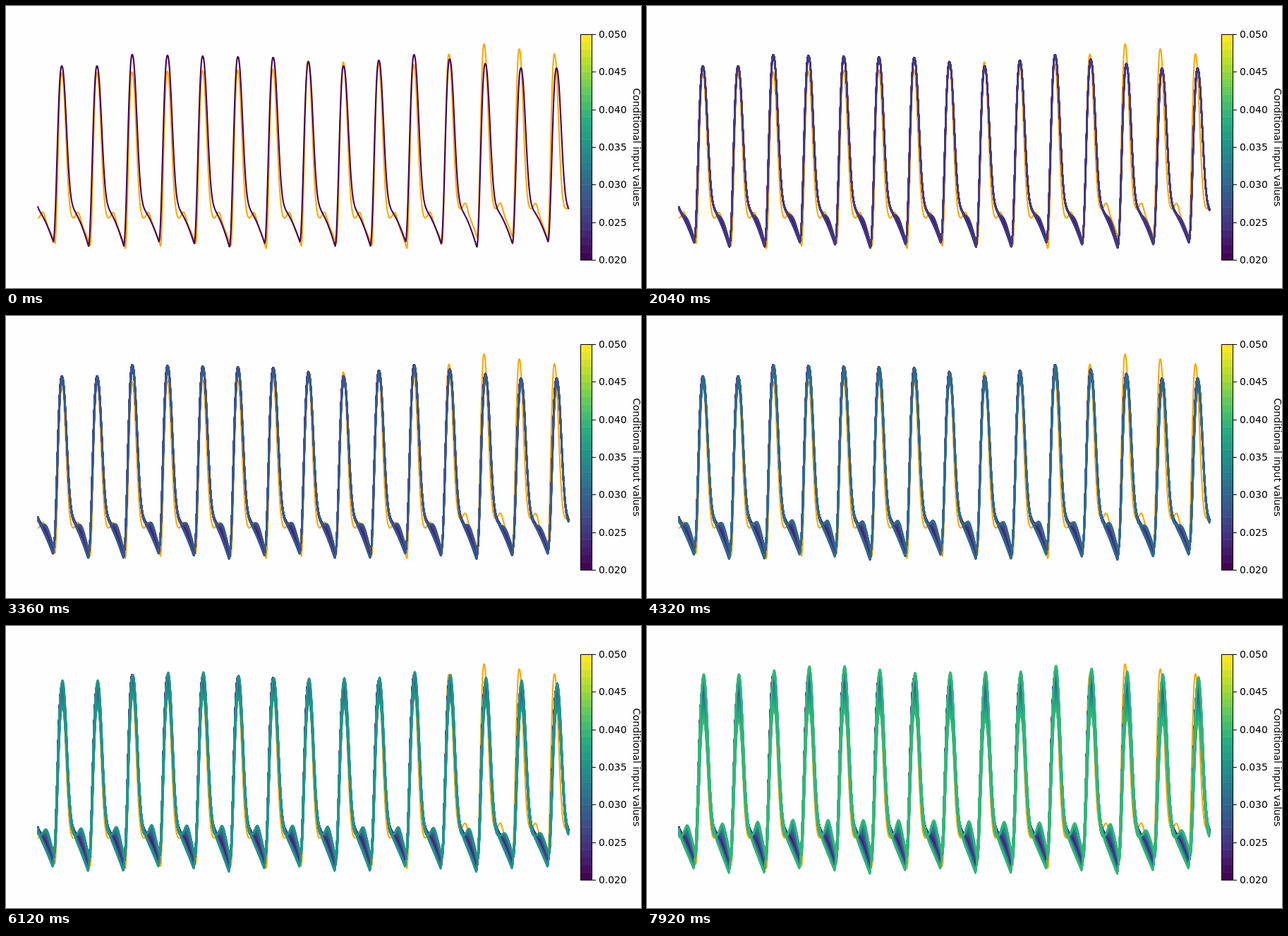
These frames come from a looping animation (900 px wide and 400 px high, 8 s). An HTML page with a canvas:

```html
<!DOCTYPE html>
<html lang="en">
<head>
<meta charset="utf-8">
<style>
  html, body { margin: 0; width: 100%; height: 100%; overflow: hidden; background: #fefefe; }
  canvas { display: block; }
</style>
</head>
<body>
<canvas id="stage" width="900" height="400"></canvas>
<script>
const ctx = document.getElementById('stage').getContext('2d');
const LOOP = 8000, STEP = 120, LAST = 66, LEVELS = 30;
const LEFT = 45, RIGHT = 797.5;

const lerp = (a, b, t) => a + (b - a) * t;
const clamp = v => Math.min(Math.max(v, 0), 1);
const ease = v => (1 - Math.cos(Math.PI * clamp(v))) / 2;

// Linear interpolation through a few [beat, value] keys.
function along(keys, i) {
  const k = keys.findIndex(([at]) => at >= i);
  if (k < 0) return keys[keys.length - 1][1];
  if (k === 0) return keys[0][1];
  const [[a, from], [b, to]] = [keys[k - 1], keys[k]];
  return lerp(from, to, (i - a) / (b - a));
}

// Beat 0 peaks left of the plot; its tail opens the picture.
const peakX = i => 29.1 + 49.93 * i + .55 * Math.max(0, i - 11);
const restTop = i => along([[2, 85], [3, 69], [7, 73], [9, 85], [11, 69], [14, 88]], i);
const grownTop = i => along([[2, 68], [4.5, 54], [7, 66], [10, 64], [11, 56], [15, 72]], i);
const trough = i => 338 + 4 * Math.sin(2 * Math.PI * (i - 1.6) / 3.5);
const bumpShift = i => along([[0, 0], [3, -8], [7, -7], [12, -2], [13, 7]], i);
const referenceBump = i => along([[11, 293], [12, 280]], i);

const rest = {
  peak: peakX, trough, lead: 12, width: 8.8,
  floor: () => 289, tailStart: 15, power: 1.5
};
const tall = {
  peak: i => peakX(i) + 1.5, trough: i => trough(i) + 10, lead: 14.5, width: 8.3,
  floor: () => 292, tailStart: 13, power: 1
};
const bumpy = {
  peak: i => peakX(i) + 1, trough: i => trough(i) - 8, lead: 11, width: 8.2,
  floor: () => 302, tailStart: 15, power: 6,
  bump: i => 20 - bumpShift(i), bumpAt: 27, bumpWidth: 6
};
const reference = {
  peak: i => 29.1 + 49.88 * i, lead: 9.7, width: 7.8,
  trough: i => along([[11, 340.5], [14, 328]], i) + 3.5 * Math.cos(Math.PI * (i - 3) / 2),
  floor: i => referenceBump(i) + 10, tailStart: 17, power: 2,
  bump: () => 13, bumpAt: 23.5, bumpWidth: 4.5
};
const referenceTop = i => along([[1, 95], [7, 90], [8, 78], [11, 83], [13, 54], [15, 68]], i);

// Height of a pulse train: eased rise, bell-shaped fall, then a sloping tail with an optional bump.
function pulse(shape, top, x) {
  let i = Math.floor((x + 25) / 50);
  if (x >= shape.peak(i + 1) - shape.lead) i++;
  if (x < shape.peak(i) - shape.lead) i--;
  const d = x - shape.peak(i);
  if (d < 0) return lerp(top(i), shape.trough(i), ease((-d / shape.lead) ** 1.15));
  const { width, tailStart, power, bump, bumpAt, bumpWidth } = shape;
  const floor = shape.floor(i);
  const tailEnd = shape.peak(i + 1) - shape.peak(i) - shape.lead;
  const fall = 1 - Math.exp(-((d / width) ** 2.2));
  const tail = clamp((d - tailStart) / (tailEnd - tailStart)) ** power;
  const lift = bump ? bump(i) * Math.exp(-(((d - bumpAt) / bumpWidth) ** 2)) * ease(d / tailStart) : 0;
  return lerp(top(i), floor, fall) + (shape.trough(i + 1) - floor) * tail - lift;
}

function plot(color, heightAt) {
  ctx.beginPath();
  for (let x = LEFT; x <= RIGHT; x += .5) ctx.lineTo(x, heightAt(x));
  ctx.lineWidth = 2.08;
  ctx.lineJoin = 'round';
  ctx.strokeStyle = color;
  ctx.stroke();
}

const stops = ['440154', '472d7b', '3b528b', '2c728e', '21918c', '28ae80', '5ec962', 'addc30', 'fde725']
  .map(hex => [0, 2, 4].map(i => parseInt(hex.slice(i, i + 2), 16)));
function levelColor(level) {
  const v = level / (LEVELS - 1) * 8, i = Math.min(Math.floor(v), 7);
  return `rgb(${stops[i].map((c, k) => Math.round(lerp(c, stops[i + 1][k], v - i)))})`;
}

// Each step adds a pair of curves that drift apart from the resting shape.
function drawPair(n) {
  const t = n / LAST, left = LAST - n;
  const color = levelColor(Math.floor(n * LEVELS / 100));
  const morph = (shape, top) =>
    plot(color, x => lerp(pulse(rest, top, x), pulse(shape, top, x), t));
  if (n) morph(bumpy, i => restTop(i) + 50 * t * t);
  morph(tall, i => Math.min(restTop(i), grownTop(i) + .43 * left + .007 * left * left));
}

function drawColorbar() {
  const height = 320 / LEVELS;
  for (let k = 0; k < LEVELS; k++) {
    ctx.fillStyle = levelColor(k);
    ctx.fillRect(814.5, 360 - (k + 1) * height, 16, height + (k ? .5 : 0));
  }
  ctx.strokeStyle = ctx.fillStyle = '#000';
  ctx.lineWidth = 1;
  ctx.strokeRect(814.5, 40.5, 16, 320);
  ctx.font = '13.89px "DejaVu Sans", sans-serif';
  ctx.textAlign = 'left';
  for (let k = 0; k <= 6; k++) {
    const y = Math.round(360 - k * 320 / 6);
    ctx.fillRect(831, y, 5, 1);
    ctx.fillText((.02 + k * .005).toFixed(3), 840, y + 5);
  }
  ctx.save();
  ctx.translate(889, 200.5);
  ctx.rotate(Math.PI / 2);
  ctx.textAlign = 'center';
  ctx.fillText('Conditional input values', 0, 0);
  ctx.restore();
}

let drawn = Infinity;
function frame(now) {
  const count = Math.floor(now % LOOP / STEP);
  if (count < drawn) {
    ctx.fillStyle = '#fefefe';
    ctx.fillRect(0, 0, 900, 400);
    drawColorbar();
    plot('orange', x => pulse(reference, referenceTop, x));
    drawn = -1;
  }
  while (drawn < count) drawPair(++drawn);
  requestAnimationFrame(frame);
}
requestAnimationFrame(frame);
</script>
</body>
</html>
```
